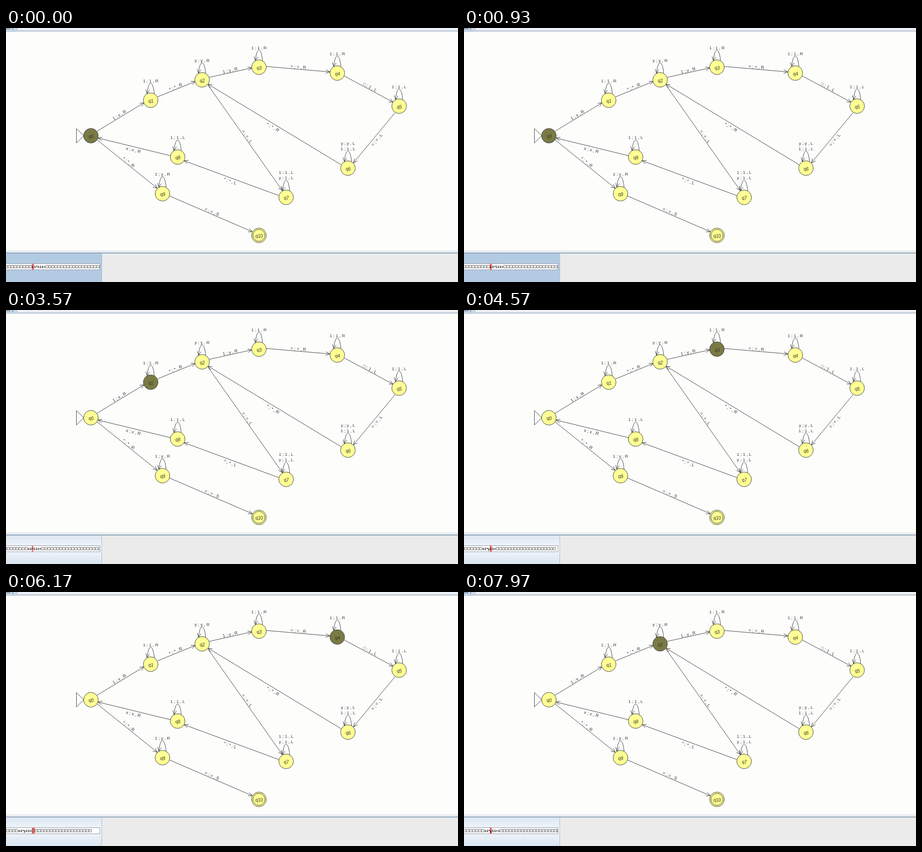
These frames come from a looping animation (998 by 561 pixels, 8000 ms). An HTML page:

```html
<!DOCTYPE html>
<html lang="en">
<head>
<meta charset="utf-8">
<title>Turing machine</title>
<style>
html, body { margin: 0; width: 100%; height: 100%; overflow: hidden; background: #fdfdfc; }
svg { display: block; width: 998px; height: 561px; font-family: "Liberation Sans", Arial, sans-serif; font-kerning: none; }
.line { fill: none; stroke: #3c3c3c; stroke-width: 1; }
.node circle { fill: #ffff95; stroke: #3c3c3c; }
.node.on circle { fill: #7a7a45; }
.label { font-size: 9.7px; fill: #3a3a3a; text-anchor: middle; }
.name { font-size: 10px; fill: #33331c; text-anchor: middle; }
#chars { font-size: 8px; font-weight: bold; fill: #111; }
#blanks { fill: none; stroke: #4a4a4a; stroke-width: .8; }
</style>
</head>
<body>
<svg viewBox="0 0 998 561">
  <defs>
    <linearGradient id="pale" x2="0" y2="1">
      <stop offset="0" stop-color="#dce7f2"/>
      <stop offset=".45" stop-color="#f3f7fb"/>
      <stop offset="1" stop-color="#d9e5f1"/>
    </linearGradient>
    <clipPath id="strip"><rect y="519" width="207" height="16"/></clipPath>
  </defs>
  <rect width="998" height="561" fill="#fdfdfc"/>
  <rect width="998" height="7" fill="#eef2f6"/>
  <rect width="24" height="7" fill="#c9d9ea"/>
  <path d="M24.5 0V5.5H998M0 7.5H998" fill="none" stroke="#a3b7cb"/>
  <text x="0" y="3" font-size="9" fill="#345">tor )</text>
  <g id="graph"></g>
  <rect y="491" width="998" height="5" fill="#e9edf0"/>
  <rect y="496" width="998" height="2" fill="#8da3b8"/>
  <rect y="498" width="998" height="63" fill="#ebebeb"/>
  <rect id="panel" y="498" width="211" height="63"/>
  <path d="M211.5 498V561" stroke="#a9b8c7"/>
  <rect x="-2" y="520.5" width="209.5" height="13.5" fill="#fff" stroke="#8b959e"/>
  <g clip-path="url(#strip)">
    <rect id="head" x="57" y="520" width="4.5" height="14" fill="#ee6c6c"/>
    <path id="blanks"/>
    <text id="chars" y="530"></text>
  </g>
</svg>
<script>
const $ = id => document.getElementById(id);
const graph = $('graph');

function add(parent, tag, attrs, text) {
  const el = document.createElementNS('http://www.w3.org/2000/svg', tag);
  for (const k in attrs) el.setAttribute(k, attrs[k]);
  if (text) el.textContent = text;
  return parent.appendChild(el);
}

// "1;x,R" is shown with a space around each sign
const spaced = s => [...s].join(' ');

function arrow(x, y, angle) {
  const barb = turn => {
    const a = angle + Math.PI + turn;
    return `${x + 10 * Math.cos(a)} ${y + 10 * Math.sin(a)}`;
  };
  return `M${barb(.42)}L${x} ${y}L${barb(-.42)}`;
}

function edge([x1, y1, x2, y2, rule]) {
  const angle = Math.atan2(y2 - y1, x2 - x1);
  const back = x2 < x1;
  const deg = angle * 180 / Math.PI + (back ? 180 : 0);
  add(graph, 'path', { class: 'line', d: `M${x1} ${y1}L${x2} ${y2}` + arrow(x2, y2, angle) });
  add(graph, 'text', {
    class: 'label', y: back ? 10.5 : -2,
    transform: `translate(${(x1 + x2) / 2} ${(y1 + y2) / 2}) rotate(${deg})`
  }, spaced(rule));
}

function node([x, y, ...loops], i) {
  if (loops.length) {
    add(graph, 'path', {
      class: 'line',
      d: `M${x + 8} ${y - 14}C${x + 5} ${y - 45.5} ${x - 5} ${y - 45.5} ${x - 8} ${y - 14}` + arrow(x - 8, y - 14, 1.72)
    });
  }
  loops.forEach((rule, k) =>
    add(graph, 'text', { class: 'label', x, y: y - 40 - 12 * k }, spaced(rule)));
  const g = add(graph, 'g', { class: 'node' });
  add(g, 'circle', { cx: x, cy: y, r: 16.2 });
  if (i === 10) add(g, 'circle', { cx: x, cy: y, r: 13.3 });
  add(g, 'text', { class: 'name', x: x + .5, y: y + 5 }, 'q' + i);
  return g;
}

[
  [201, 228, 305, 165, '1;x,R'],
  [335, 152, 418, 118, '*;*,R'],
  [449, 109, 543, 88, '1;y,R'],
  [575, 85, 715, 97, '=;=,R'],
  [747, 106, 855, 164, '□;1,L'],
  [859, 187, 767, 298, '=;=,L'],
  [740, 302, 446, 124, '*;*,R'],
  [446, 126, 610, 359, '=;=,L'],
  [602, 370, 393, 293, '*;*,L'],
  [363, 282, 203, 243, 'x;x,R'],
  [201, 247, 334, 354, '*;*,R'],
  [361, 371, 544, 450, '=;=,S']
].forEach(edge);

add(graph, 'path', { class: 'line', d: 'M155.5 222V254L171.5 238Z' });

const nodes = [
  [187.5, 238],
  [319.5, 159.5, '1;1,R'],
  [433, 114.5, 'y;y,R'],
  [558.5, 86.5, '1;1,R'],
  [731.5, 99.5, '1;1,R'],
  [868, 172.5, '1;1,L'],
  [755, 309.5, '1;1,L', 'y;y,L'],
  [618.5, 374, 'y;1,L', '1;1,L'],
  [379, 285, '1;1,L'],
  [345.5, 366, '1;y,R'],
  [558.5, 458]
].map(node);

// time, state, head position
const steps = [
  [0, 0, 0], [2870, 1, 1], [3400, 1, 2], [3930, 2, 3], [4400, 3, 4],
  [4970, 3, 5], [5500, 3, 6], [5870, 4, 7], [6230, 5, 6], [6570, 6, 5],
  [6930, 6, 4], [7230, 6, 3], [7530, 6, 2], [7870, 2, 3]
];
const HEAD = 57, BLANK = 6.62;
const charWidth = c => c === '*' ? 3.11 : c === '=' ? 4.67 : 4.45;
const textWidth = s => [...s].reduce((w, c) => w + charWidth(c), 0);
const box = x => `M${x + .7} 524.3h5.1v5.6h-5.1z`;

function show(n) {
  const [, state, pos] = steps[n];
  const tape = (n > 0 ? 'x' : '1') + '1*' + (n > 3 ? 'y' : '1') + '11=' + (n > 7 ? '1' : '');
  const left = HEAD - textWidth(tape.slice(0, pos));
  const right = left + textWidth(tape);
  let d = '';
  for (let x = left - BLANK; x > -BLANK; x -= BLANK) d += box(x);
  for (let k = 0; k < 20; k++) d += box(right + k * BLANK);
  $('blanks').setAttribute('d', d);
  $('chars').setAttribute('x', left);
  $('chars').textContent = tape;
  $('head').setAttribute('width', pos < tape.length ? charWidth(tape[pos]) : BLANK);
  $('panel').setAttribute('fill', n ? 'url(#pale)' : '#b3cae3');
  nodes.forEach((g, i) => g.classList.toggle('on', i === state));
}

let shown = -1;
const start = performance.now();
function tick() {
  const t = (performance.now() - start) % 8000;
  const n = steps.filter(s => s[0] <= t).length - 1;
  if (n !== shown) show(shown = n);
  requestAnimationFrame(tick);
}
tick();
</script>
</body>
</html>
```
